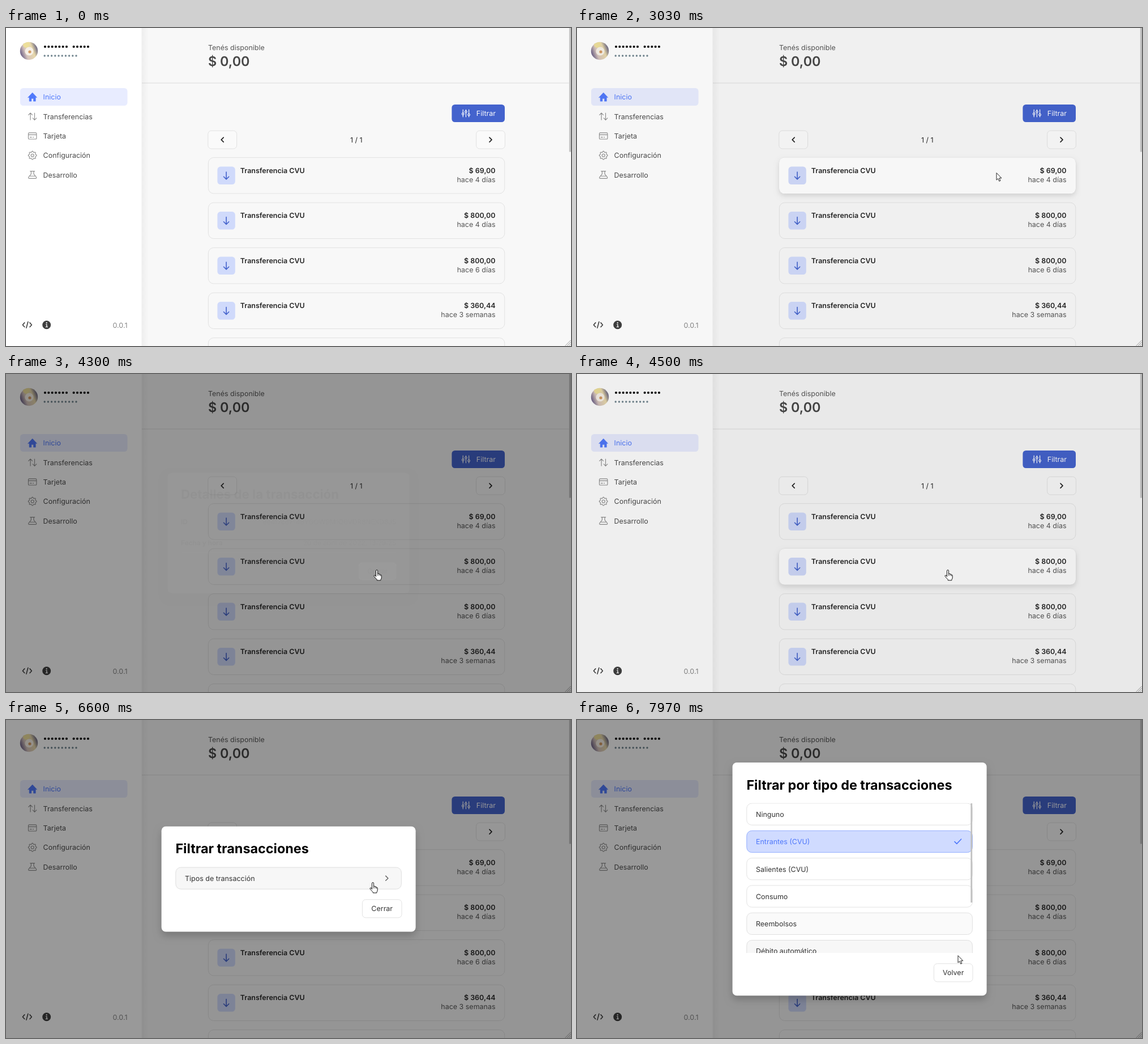
These frames come from a looping animation (998x561 px, 8 s). An HTML page with a canvas:

```html
<!DOCTYPE html>
<html lang="es">
<head>
<meta charset="utf-8">
<title>Inicio</title>
<style>
  html, body { margin: 0; width: 100%; height: 100%; overflow: hidden; background: #f8f8f8; }
  canvas { display: block; width: 998px; height: 561px; }
</style>
</head>
<body>
<canvas id="stage"></canvas>
<script>
const W = 998, H = 561, LOOP = 8000;
const BODY = 12.475, TITLE = 23.39;
const BLUE = '#4f78fb', LINE = '#e1e1e1', INK = '#262626';
const canvas = document.getElementById('stage');
const ctx = canvas.getContext('2d');
const dpr = window.devicePixelRatio || 1;
canvas.width = W * dpr;
canvas.height = H * dpr;

// ---------- timing ----------
const clamp = x => Math.max(0, Math.min(1, x));

// cubic-bezier(.4, 0, .2, 1)
function ease(x) {
  x = clamp(x);
  if (x === 0 || x === 1) return x;
  let lo = 0, hi = 1, s = 0.5;
  for (let i = 0; i < 20; i++) {
    s = (lo + hi) / 2;
    const bx = 1.2 * s * (1 - s) ** 2 + 0.6 * s * s * (1 - s) + s ** 3;
    if (bx < x) lo = s; else hi = s;
  }
  return s * s * (3 - 2 * s);
}

// rises at a, falls at b
const pulse = (t, a, b, up = 150, down = up) => ease((t - a) / up) - ease((t - b) / down);

const curves = {
  in: u => u * u,
  out: u => 1 - (1 - u) ** 2,
  smooth: u => u * u * (3 - 2 * u)
};

// start, end, from, to, curve
const moves = [
  [1600, 2380, [981, 438], [757, 300], 'in'],
  [2380, 2470, [757, 300], [741, 256], 'out'],
  [3080, 3430, [741, 256], [653, 300], 'smooth'],
  [3430, 3850, [653, 300], [655, 346], 'smooth'],
  [4550, 5060, [655, 346], [826, 157], 'smooth'],
  [5800, 6350, [826, 157], [648, 287], 'smooth'],
  [7470, 7970, [648, 287], [673, 416], 'in']
];
const handTimes = [
  [2139, 2357], [2389, 2980], [3720, 4695], [4728, 4847], [4994, 5610],
  [6190, 6900], [7558, 7758], [7790, 7891], [7912, 7960]
];

// ---------- drawing helpers ----------
function text(s, x, y, color, weight = 400, align = 'left', size = BODY) {
  ctx.font = `${weight} ${size}px Inter, "Liberation Sans", sans-serif`;
  ctx.textAlign = align;
  ctx.fillStyle = color;
  ctx.fillText(s, x, y + size * 0.364);
}

function box(x, y, w, h, r, fill, stroke) {
  ctx.beginPath();
  ctx.roundRect(x, y, w, h, r);
  if (fill) { ctx.fillStyle = fill; ctx.fill(); }
  if (stroke) { ctx.strokeStyle = stroke; ctx.lineWidth = 0.95; ctx.stroke(); }
}

function rect(x, y, w, h, fill) {
  ctx.fillStyle = fill;
  ctx.fillRect(x, y, w, h);
}

function dot(x, y, r, fill) {
  ctx.beginPath();
  ctx.arc(x, y, r, 0, Math.PI * 2);
  ctx.fillStyle = fill;
  ctx.fill();
}

// SVG path placed at x, y
function icon(d, x, y, stroke, width = 1.2, fill) {
  ctx.save();
  ctx.translate(x, y);
  ctx.lineCap = ctx.lineJoin = 'round';
  const path = new Path2D(d);
  if (fill) { ctx.fillStyle = fill; ctx.fill(path); }
  if (stroke) { ctx.strokeStyle = stroke; ctx.lineWidth = width; ctx.stroke(path); }
  ctx.restore();
}

function shadow(dy, blur, alpha) {
  ctx.shadowColor = `rgba(0,0,0,${alpha})`;
  ctx.shadowOffsetY = dy * dpr;
  ctx.shadowBlur = blur * dpr;
}

const grey = h => `rgba(0,0,0,${0.03 * h})`;

// ---------- sidebar ----------
const icons = {
  swap: 'M-3.6 6V-6M-7 -2.8L-3.6 -6.2L-.2 -2.8M3.8 -6V6M.6 2.8L3.8 6.2L7.2 2.8',
  card: 'M-5.6 -5.6H5.6Q7.2 -5.6 7.2 -4V4Q7.2 5.6 5.6 5.6H-5.6Q-7.2 5.6 -7.2 4V-4Q-7.2 -5.6 -5.6 -5.6ZM-7.2 -2H7.2M-4.4 2.2H-1.4M1 2.2H2',
  cog: cogPath(),
  flask: 'M-4 -6.4H4M-2.3 -6.4V-1.4L-6.8 4Q-7.6 6.4 -5.6 6.4H5.6Q7.6 6.4 6.8 4L2.3 -1.4V-6.4M-5 2.2H5'
};

function cogPath() {
  let d = '';
  for (let i = 0; i < 32; i++) {
    const a = (i - 0.5) / 32 * Math.PI * 2, r = i % 4 < 2 ? 7.3 : 5.8;
    d += `${i ? 'L' : 'M'}${r * Math.cos(a)} ${r * Math.sin(a)}`;
  }
  return d + 'ZM2.5 0A2.5 2.5 0 1 1 -2.5 0A2.5 2.5 0 1 1 2.5 0Z';
}

function avatar() {
  ctx.save();
  ctx.beginPath();
  ctx.arc(40.5, 40.5, 15.7, 0, Math.PI * 2);
  ctx.clip();
  const g = ctx.createLinearGradient(25, 46, 56, 34);
  g.addColorStop(0, '#655a83');
  g.addColorStop(0.3, '#d6c4bd');
  g.addColorStop(0.7, '#e8d9ab');
  g.addColorStop(1, '#5b587c');
  rect(24, 24, 33, 33, g);
  dot(36, 29, 6, '#eddf9b');
  dot(41, 41, 7.5, '#f6f0e6');
  dot(42, 42, 2.6, '#d39a63');
  ctx.restore();
}

function sidebar() {
  const g = ctx.createLinearGradient(239, 0, 252, 0);
  g.addColorStop(0, 'rgba(0,0,0,.045)');
  g.addColorStop(1, 'rgba(0,0,0,0)');
  rect(239, 0, 13, H, g);
  rect(0, 0, 239.5, H, '#fff');
  avatar();
  for (let i = 0; i < 13; i++) if (i !== 7) dot(69 + i * 6.33, 33, 2.1, '#0a0a0a');
  for (let i = 0; i < 10; i++) dot(68.2 + i * 6.2, 49, 1.7, '#71858f');

  box(25, 106, 189.5, 31, 5.5, '#e8ecff');
  icon('M-8 .8L0 -7.8L8 .8H5.6V7.4H1.8V2.8H-1.8V7.4H-5.6V.8Z', 46.7, 121.8, BLUE, 0.5, BLUE);
  text('Inicio', 65.6, 121.8, BLUE);
  const links = [['Transferencias', 'swap'], ['Tarjeta', 'card'], ['Configuración', 'cog'], ['Desarrollo', 'flask']];
  links.forEach(([label, name], i) => {
    const y = 156.1 + i * 34.3;
    icon(icons[name], 46.7, y, '#8f8f8f', 1.15);
    text(label, 65.6, y, '#4b4b4b');
  });

  icon('M-4.6 -3.8L-8 0L-4.6 3.8M4.6 -3.8L8 0L4.6 3.8M1.5 -5.4L-1.5 5.4', 37.4, 523.7, '#3f3f3f', 1.6);
  dot(71.7, 523.7, 7.5, '#3f3f3f');
  dot(71.7, 520.2, 1.15, '#fff');
  icon('M-1 -.6H.3V3.6M-1.4 3.6H1.7', 71.7, 523.7, '#fff', 1.3);
  text('0.0.1', 214.5, 524, '#868686', 400, 'right');
}

// ---------- page ----------
const amounts = [
  ['$ 69,00', 'hace 4 días'], ['$ 800,00', 'hace 4 días'],
  ['$ 800,00', 'hace 6 días'], ['$ 360,44', 'hace 3 semanas'], ['', '']
];

function card(i, hover) {
  const y = 228.6 + i * 79.5;
  box(357.4, y, 523.4, 63.4, 9.4, '#f8f8f8', LINE);
  if (hover > 0) {
    ctx.save();
    ctx.globalAlpha = hover;
    shadow(4, 9, 0.13);
    box(357, y, 524, 63.6, 9.4, '#fff');
    ctx.restore();
  }
  const [sum, age] = amounts[i];
  if (!sum) return;
  box(373.4, y + 16, 31.4, 31.4, 5.5, '#d0dafb');
  icon('M0 -6.4V6.4M-4.6 1.9L0 6.5L4.6 1.9', 389.1, y + 31.8, '#4463cc', 1.6);
  text('Transferencia CVU', 413.8, y + 22.8, INK, 600);
  text(sum, 864.5, y + 22.8, INK, 600, 'right');
  text(age, 864.5, y + 38.4, '#555', 400, 'right');
}

function filterButton(hover) {
  box(787.4, 135, 93.6, 31, 5.5, '#4463cd');
  ctx.save();
  ctx.globalAlpha = hover;
  box(787.4, 135, 93.6, 31, 5.5, '#4f78ff');
  ctx.restore();
  icon('M-5.2 -6.4V-.6M-5.2 3V6.4M0 -6.4V-4.4M0 -.8V6.4M5.2 -6.4V.8M5.2 4.4V6.4', 812.4, 150.4, '#fff', 1.2);
  [1.2, -2.6, 2.6].forEach((dy, i) => {
    ctx.beginPath();
    ctx.arc(807.2 + i * 5.2, 150.4 + dy, 1.7, 0, 7);
    ctx.strokeStyle = '#fff';
    ctx.lineWidth = 1.2;
    ctx.stroke();
  });
  text('Filtrar', 830.8, 150.6, '#fff');
}

function page(t) {
  rect(0, 0, W, H, '#f8f8f8');
  rect(240, 96.6, 754.5, 0.9, '#dadada');
  text('Tenés disponible', 357, 34.5, '#555');
  text('$ 0,00', 357, 58.4, '#474747', 600, 'left', TITLE);
  filterButton(pulse(t, 4994, 5650));

  for (const [x, d] of [[356.8, 1], [830.6, -1]]) {
    box(x, 181.2, 50.8, 31.8, 6, '#fafafa', LINE);
    icon(`M${2 * d} -4L${-2 * d} 0L${2 * d} 4`, x + 25.4, 197.2, '#222', 1.7);
  }
  text('1 / 1', 618.8, 197.3, INK, 400, 'center');

  const hovers = [
    pulse(t, 2389, 3060) + pulse(t, 4728, 4847),
    pulse(t, 2139, 2357) + pulse(t, 4310, 4695)
  ];
  for (let i = 0; i < 5; i++) card(i, hovers[i] || 0);

  sidebar();
  rect(994.8, 0, 3.2, 218.5, '#c3c3c3');
  icon('M-9.5 0L0 -9.5M-6 0L0 -6M-2.5 0L0 -2.5', 997.5, 560.5, '#9a9a9a', 1);
}

// ---------- dialogs ----------
function dialog(v, top, height, title, body) {
  if (v <= 0) return;
  const s = 0.95 + 0.05 * v;
  ctx.save();
  ctx.globalAlpha = v;
  ctx.translate(499, 280.5);
  ctx.scale(s, s);
  ctx.translate(-499, -280.5);
  ctx.save();
  shadow(7, 14, 0.2);
  box(274.6, top, 449, height, 7.5, '#fff');
  ctx.restore();
  text(title, 299.4, top + 39, '#000', 700, 'left', TITLE);
  body();
  ctx.restore();
}

function button(label, x, y, hover = 0) {
  box(x, y, 699 - x, 32, 6, '#fff', LINE);
  box(x, y, 699 - x, 32, 6, grey(hover));
  text(label, (x + 699) / 2, y + 16, '#333', 400, 'center');
}

function option(label, y, hover, on) {
  box(299.8, y, 398.6, 38.3, 9, on ? '#d0dbff' : '#fff', on ? '#8fabff' : LINE);
  box(299.8, y, 398.6, 38.3, 9, grey(hover));
  text(label, 316, y + 19.4, on ? BLUE : '#333');
}

function field(label, value, y) {
  text(label, 299.4, y, '#000', 600);
  text(value, 698.8, y, '#666', 400, 'right');
  rect(299.4, y + 18.2, 399.4, 0.9, '#dcdcdc');
}

function details(t) {
  dialog(pulse(t, 3100, 4130, 300, 220), 169, 223, 'Detalles de la transacción', () => {
    field('ID', 'ee4f7cd7-46YGOW9M1Q6VDR8NEXD8J5', 260);
    field('Fecha y hora', '20 de abril de 2022, 13:29:25', 298.2);
    button('Cerrar', 629.4, 335.4, pulse(t, 3720, 4250));
  });
}

function filters(t) {
  dialog(pulse(t, 5750, 6650, 300), 187.8, 185.6, 'Filtrar transacciones', () => {
    option('Tipos de transacción', 260, pulse(t, 6190, 6950));
    icon('M-2.1 -4.1L2.1 0L-2.1 4.1', 672.8, 279.2, '#666', 1.5);
    button('Cerrar', 629.4, 316.8);
  });
}

function types(t) {
  dialog(pulse(t, 6980, 1e6, 340), 75, 411.3, 'Filtrar por tipo de transacciones', () => {
    const hover = (a, b) => pulse(t, a, b, 50, 250);
    const rows = [
      ['Ninguno', 0], ['Entrantes (CVU)', 0], ['Salientes (CVU)', 0],
      ['Consumo', hover(7558, 7758)],
      ['Reembolsos', hover(7790, 7891)],
      ['Débito automático', hover(7912, 7960)]
    ];
    ctx.save();
    ctx.beginPath();
    ctx.rect(299, 146.6, 400, 264.4);
    ctx.clip();
    rows.forEach(([label, h], i) => option(label, 147 + i * 48.3, h, i === 1));
    icon('M-5.8 .2L-2 4L5.8 -4.2', 672.8, 214.4, BLUE, 1.6);
    rect(695.4, 147, 2.8, 175, '#c1c1c1');
    ctx.restore();
    button('Volver', 630.4, 429.8);
  });
}

// ---------- pointer ----------
function pointer(t) {
  if (t < moves[0][0]) return;
  const [a, b, from, to, curve] = moves.filter(m => t >= m[0]).pop();
  const u = curves[curve](clamp((t - a) / (b - a)));
  const x = from[0] + (to[0] - from[0]) * u, y = from[1] + (to[1] - from[1]) * u;
  if (handTimes.some(([s, e]) => t >= s && t < e)) {
    icon('M-1.5 11V1.2a1.5 1.5 0 0 1 3 0V6.4Q3.9 5.6 4.1 7.2Q6.3 6.6 6.5 8.3Q8.2 8 8.2 10V13Q8.2 15.2 6.9 16.6V18H.2V16.6Q-2.6 14 -5 10.6Q-5.3 8.4 -3.2 9.2Z', x, y, '#111', 1, '#fff');
    icon('M1.5 6.4V9.6M4.1 7.2V9.8M6.5 8.3V10.2', x, y, '#111', 0.8);
  } else if (t >= 3300 && t < 3500) {
    const beam = 'M0 -5.6V5.6M-2.4 -6.2Q0 -6.2 0 -5.2Q0 -6.2 2.4 -6.2M-2.4 6.2Q0 6.2 0 5.2Q0 6.2 2.4 6.2';
    icon(beam, x, y, '#fff', 2.2);
    icon(beam, x, y, '#111', 1.1);
  } else {
    icon('M0 0V12.2L2.8 9.6L4.8 14.3L6.9 13.4L4.9 8.8H8.5Z', x, y, '#222', 1, '#fff');
  }
}

function frame(now) {
  const t = now % LOOP;
  ctx.setTransform(dpr, 0, 0, dpr, 0, 0);
  ctx.textBaseline = 'alphabetic';
  ctx.textRendering = 'geometricPrecision';
  page(t);
  const dim = pulse(t, 2982, 4330, 300) + pulse(t, 5610, 1e6, 300);
  rect(0, 0, W, H, `rgba(0,0,0,${0.4 * dim})`);
  details(t);
  filters(t);
  types(t);
  pointer(t);
  requestAnimationFrame(tick);
}

let start;
function tick(now) {
  if (start === undefined) start = now;
  frame(now - start);
}
requestAnimationFrame(tick);
</script>
</body>
</html>
```
